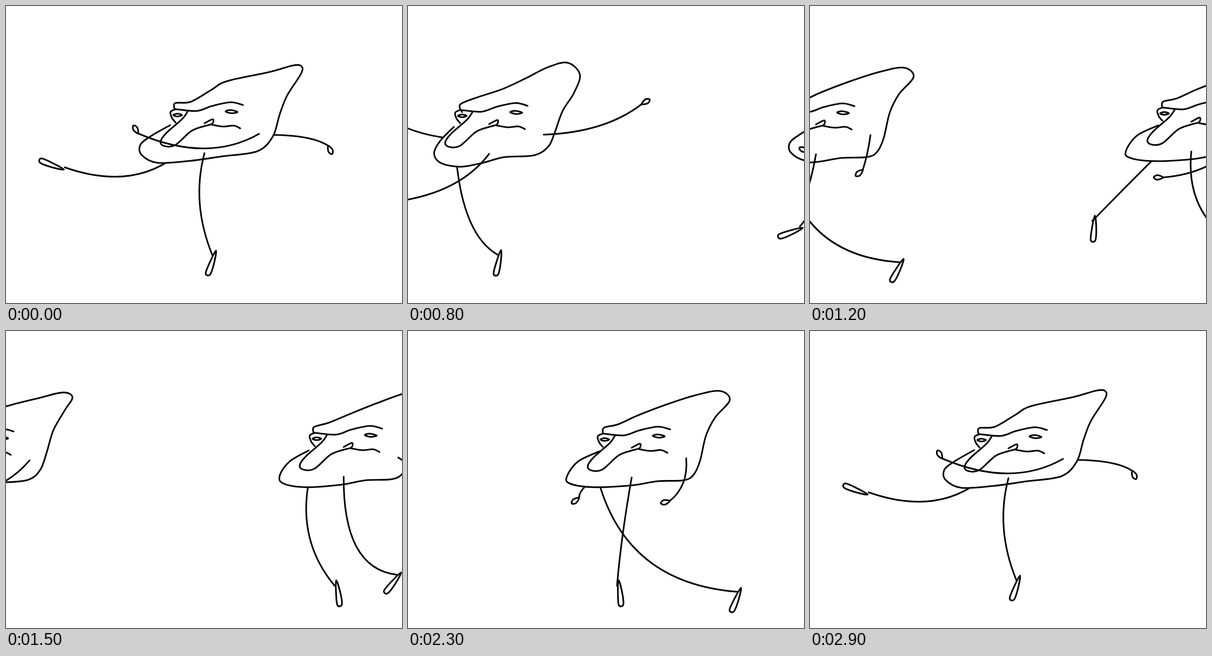
Animation of 864x648 px, one loop 3000 ms. Source, as an HTML page with a canvas:

```html
<!DOCTYPE html>
<html lang="en">
<head>
<meta charset="utf-8">
<title>Walker</title>
<style>
  html, body { margin: 0; width: 100%; height: 100%; overflow: hidden; background: #fff; }
  canvas { display: block; }
</style>
</head>
<body>
<canvas id="stage" width="864" height="648"></canvas>
<script>
const ctx = document.getElementById('stage').getContext('2d');

const STEP = 100;               // ms per drawing
const STEPS = 30;               // drawings in the loop
const LAG = 29;                 // drawings between the two walkers
const CYCLE = 19;               // drawings in a full stride
const STRIDE = { x: -532, y: 4 };

const points = text => text.split(',').map(pair => pair.split(' ').map(Number));

// Head outlines, x measured from the chin.
const reach = points('76 226,77 212,111 209,156 183,190 164,283 144,333 130,352 131,352 147,321 196,305 237,290 285,256 317,180 328,108 338,38 342,4 325,1 303,24 284,66 260');
const stride = points('80 223,83 212,113 205,155 186,215 163,280 142,335 132,357 152,325 190,305 230,292 285,278 315,256 327,200 329,143 338,60 342,8 334,2 318,26 286,72 264');
const lunge = points('61 230,57 213,93 198,148 180,198 157,248 132,291 122,318 148,305 188,280 228,263 275,249 305,218 324,153 328,108 340,58 349,15 341,0 320,13 293,43 262');

// The face keeps its shape and only slides on the head.
const LINES = [
  '78 225,124 229,158 218,198 210,225 216',
  '78 225,67 231,70 244,78 254',
  '105 229,93 246,57 278,45 297,55 306,78 303,112 273,141 262,158 257,159 247,141 256',
  '157 259,182 263,205 261,219 267'
].map(points);
const EYES = ['73 238,82 235,92 238,82 241', '187 230,198 227,213 231,200 234'].map(points);

// Loops at the limb ends, pointing along +x.
const HAND = points('0 0,12 -5,20 0,12 5');
const FOOT = points('0 -5,26 -9,54 -8,54 2,26 0');
const HEEL = 12;                // how far a standing foot rises above the ankle

// Key poses: drawing in the stride, and the strides walked where it was placed.
const at = [0, 2, 4, 8, 9, 12, 13, 17];
const laps = [0, 1, 0, 0, 1, 0, 1, 2];
const heads = [reach, stride, stride, lunge, stride, stride, stride, reach];
const chin = [292, 688, 66, 57, 551, -131, 345, 832];
const slide = [0, 3, 7, -21, 15, 3, 2, 0];
const farHip = [75, 69, 71, 48, 22, 71, 71, 75];

// Limbs per key pose: bend x y, end x y, angle of the hand or foot.
const nearArm = [
  [440, 343, 288, 278, 240], [890, 365, 770, 374, 180], [355, 325, 352, 356, 128],
  [430, 276, 510, 214, -30], [950, 297, 1030, 232, -30], [126, 325, 115, 358, 140],
  [612, 338, 571, 371, 166], [980, 340, 872, 318, 205]
];
const farArm = [
  [645, 267, 703, 305, 65], [960, 310, 985, 368, 60], [140, 310, 163, 346, 24],
  [30, 298, -50, 240, 220], [590, 282, 470, 214, 220], [-120, 310, -165, 358, 170],
  [375, 325, 373, 364, 142], [1120, 290, 1160, 350, 60]
];
const nearLeg = [
  [404, 430, 450, 543, 107], [815, 480, 982, 548, 95], [236, 556, 447, 571, 101],
  [105, 418, -60, 430, 200], [600, 410, 427, 374, 203], [-5, 430, -65, 545, 95],
  [465, 450, 456, 556, 82], [945, 426, 991, 539, 107]
];
const farLeg = [
  [270, 402, 128, 352, 199], [685, 398, 616, 469, 92], [98, 450, 182, 566, 73],
  [120, 500, 196, 543, 100], [581, 458, 717, 555, 110], [-20, 545, 195, 559, 116],
  [478, 550, 718, 569, 110], [900, 430, 855, 481, 157]
];

const lerp = (a, b, t) => a + (b - a) * t;

// Smooth curve through the points.
function trace(pts, closed) {
  const n = pts.length;
  const get = i => closed ? pts[(i + n) % n] : pts[Math.max(0, Math.min(n - 1, i))];
  ctx.beginPath();
  ctx.moveTo(...pts[0]);
  for (let i = 0; i < (closed ? n : n - 1); i++) {
    const [a, b, c, d] = [get(i - 1), get(i), get(i + 1), get(i + 2)];
    ctx.bezierCurveTo(
      b[0] + (c[0] - a[0]) / 6, b[1] + (c[1] - a[1]) / 6,
      c[0] - (d[0] - b[0]) / 6, c[1] - (d[1] - b[1]) / 6,
      c[0], c[1]);
  }
  if (closed) ctx.closePath();
}

function drawLimb(rootX, rootY, [bendX, bendY, x, y, degrees], loop) {
  const angle = degrees * Math.PI / 180;
  ctx.beginPath();
  ctx.moveTo(rootX, rootY);
  ctx.quadraticCurveTo(bendX, bendY, x, y);
  ctx.stroke();

  ctx.save();
  ctx.translate(x, y);
  ctx.rotate(angle);
  if (loop === FOOT) ctx.translate(-HEEL * Math.max(0, Math.sin(angle)), 0);
  trace(loop, true);
  ctx.stroke();
  ctx.restore();
}

function drawWalker(step) {
  const lap = Math.floor(step / CYCLE);
  const local = step - lap * CYCLE;
  const i = at.findLastIndex(start => start <= local);
  const j = (i + 1) % at.length;
  const wrap = j ? 0 : 1;
  const mix = (local - at[i]) / (at[j] + wrap * CYCLE - at[i]);

  // Values between the two key poses, as walked ground positions where needed.
  const between = track => lerp(track[i], track[j], mix);
  const walked = lerp(laps[i], laps[j] + wrap, mix);
  const limb = track => track[i].map((v, k) => {
    const shift = k === 4 ? 0 : k % 2 ? STRIDE.y : STRIDE.x;
    return lerp(v, track[j][k], mix) + shift * walked;
  });

  const x = between(chin) + STRIDE.x * walked;
  const y = STRIDE.y * local / CYCLE;
  const face = x + between(slide);
  const outline = heads[i].map(([px, py], k) =>
    [lerp(px, heads[j][k][0], mix) + x, lerp(py, heads[j][k][1], mix) + y]);

  ctx.save();
  ctx.translate(STRIDE.x * lap, STRIDE.y * lap);
  drawLimb(face + 150, y + 290, limb(farArm), HAND);
  drawLimb(x + between(farHip), y + 330, limb(farLeg), FOOT);

  trace(outline, false);
  ctx.fill();
  ctx.stroke();

  ctx.save();
  ctx.translate(face, y);
  for (const line of LINES) { trace(line, false); ctx.stroke(); }
  for (const eye of EYES) { trace(eye, true); ctx.stroke(); }
  ctx.restore();

  drawLimb(face + 260, y + 279, limb(nearArm), HAND);
  drawLimb(face + 141, y + 321, limb(nearLeg), FOOT);
  ctx.restore();
}

function render(ms) {
  const step = Math.floor(ms / STEP) % STEPS;
  ctx.fillStyle = '#fff';
  ctx.fillRect(0, 0, 864, 648);
  ctx.strokeStyle = '#040700';
  ctx.lineWidth = 3.6;
  ctx.lineCap = ctx.lineJoin = 'round';
  drawWalker(step);
  drawWalker(step - LAG);
}

const start = performance.now();
function tick() {
  render(performance.now() - start);
  requestAnimationFrame(tick);
}
tick();
</script>
</body>
</html>
```
